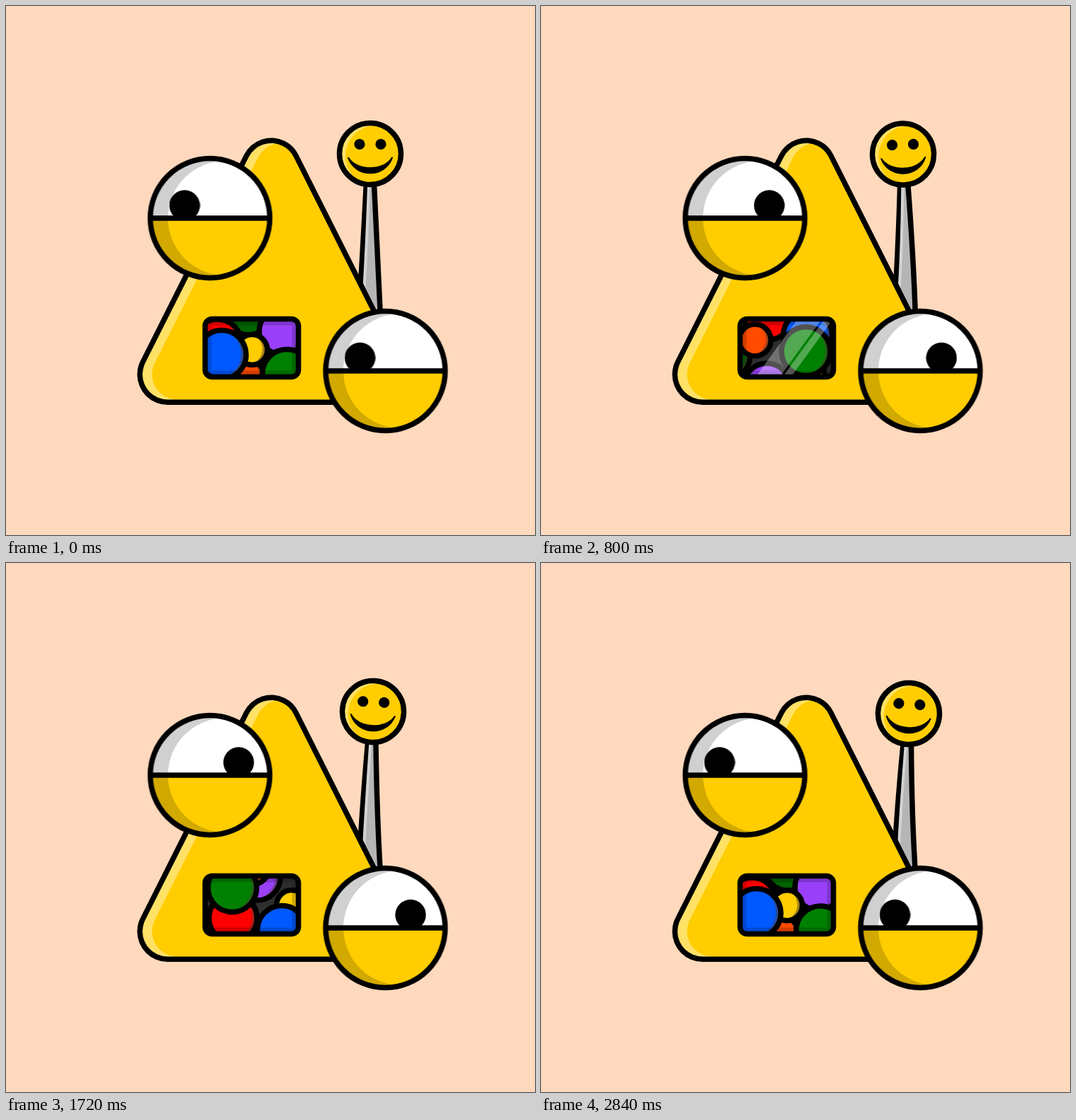
These frames come from a looping animation (748 by 748 pixels, 2880 ms). An HTML page:

```html
<!DOCTYPE html>
<html lang="en">
<head>
<meta charset="utf-8">
<title>Triangle creature</title>
<style>
  html, body { margin: 0; width: 100%; height: 100%; overflow: hidden; background: #ffd9bd; }
  svg { display: block; width: 100vw; height: 100vh; }
  .line { fill: none; stroke: #000; stroke-width: 7.5; }
  .pupil { animation: look 2880ms infinite; }
  @keyframes look {
    0% { transform: translateX(0); animation-timing-function: cubic-bezier(.17, .17, .15, 1); }
    49.3% { transform: translateX(var(--reach)); animation-timing-function: cubic-bezier(.85, 0, .83, .83); }
    98.6%, 100% { transform: translateX(0); }
  }
</style>
</head>
<body>
<svg viewBox="0 0 748 748">
  <defs>
    <path id="tri" d="M228.5 521L375 229.5L521.5 521Z" stroke-linejoin="round"/>
    <mask id="bodyMask" maskUnits="userSpaceOnUse" x="0" y="0" width="748" height="748">
      <use href="#tri" fill="#fff" stroke="#fff" stroke-width="71"/>
    </mask>
    <clipPath id="ball"><circle r="84.5"/></clipPath>
    <clipPath id="upper"><rect x="-85" y="-85" width="170" height="85"/></clipPath>
    <clipPath id="headClip"><circle r="43.5"/></clipPath>
    <clipPath id="glass"><rect x="281.5" y="442.5" width="132" height="82" rx="10"/></clipPath>
    <g id="eyeBack" clip-path="url(#ball)">
      <rect x="-85" y="-85" width="170" height="85" fill="#d0d0d0"/>
      <rect x="-85" width="170" height="85" fill="#d1a900"/>
      <path d="M-59.5 0A81 81 0 0 1 102.5 0Z" fill="#fff"/>
      <path d="M-59.5 0A81 81 0 0 0 102.5 0Z" fill="#ffcd00"/>
    </g>
    <g id="eyeFront" class="line"><path d="M-84 0H84"/><circle r="84.5"/></g>
  </defs>

  <rect width="748" height="748" fill="#ffd9bd"/>

  <path id="rod" fill="#b5b5b5" stroke="#000" stroke-width="7.5"/>
  <path id="rodLight" fill="none" stroke="#d2d2d2" stroke-width="4"/>
  <g id="head">
    <circle r="43.5" fill="#ffe166"/>
    <circle cx="8" cy="3" r="43" fill="#ffcd00" clip-path="url(#headClip)"/>
    <circle class="line" r="43.5"/>
    <circle cx="-15" cy="-13.5" r="7.6"/>
    <circle cx="15" cy="-13.5" r="7.6"/>
    <path d="M-31 5.5C-21 34.5 21 34.5 31 5.5C19 25 -19 25 -31 5.5Z" stroke="#000" stroke-width="2" stroke-linejoin="round"/>
  </g>

  <use href="#tri" stroke="#000" stroke-width="86"/>
  <g mask="url(#bodyMask)">
    <rect width="748" height="748" fill="#ffe166"/>
    <use href="#tri" x="13.5" fill="#ffcd00" stroke="#ffcd00" stroke-width="71"/>
  </g>

  <g clip-path="url(#glass)">
    <rect x="278" y="439" width="139" height="89" fill="#2e2e2e"/>
    <g id="balls"></g>
    <rect x="281.5" y="442.5" width="132" height="82" rx="10" fill="none" stroke="#000" stroke-opacity=".18" stroke-width="18"/>
    <path id="glare" fill="#fff" fill-opacity=".32" d="M-46 445H-12L-68 522H-102ZM-8 445H4L-52 522H-64Z"/>
  </g>
  <rect class="line" x="281.5" y="442.5" width="132" height="82" rx="10"/>

  <g transform="translate(288.5 300)">
    <use href="#eyeBack"/>
    <g clip-path="url(#upper)"><circle class="pupil" style="--reach: 78px" cx="-36" cy="-18" r="21.7"/></g>
    <use href="#eyeFront"/>
  </g>
  <g transform="translate(536.5 516)">
    <use href="#eyeBack"/>
    <g clip-path="url(#upper)"><circle class="pupil" style="--reach: 73px" cx="-36" cy="-18.5" r="21.7"/></g>
    <use href="#eyeFront"/>
  </g>
</svg>
<script>
  const LOOP = 2880;
  const KEYS = [0, 520, 1080, 1720, 2120, 2440];
  const $ = id => document.getElementById(id);

  // Back to front; each path lists the x and y a ball passes at KEYS.
  const BALLS = [
    { color: '#006400', r: 32, x: [343, 272, 271, 330, 412, 408], y: [433, 484, 492, 425, 506, 436] },
    { color: '#9a40fa', r: 33, x: [391, 338, 313, 355, 364, 377], y: [460, 544, 514, 444, 466, 478] },
    { color: '#ff0000', r: 34, x: [299, 298, 342, 321, 310, 291], y: [477, 442, 445, 502, 495, 490] },
    { color: '#ff4a00', r: 22.5, x: [343, 322, 293, 349, 325, 309], y: [524, 490, 457, 432, 458, 489] },
    { color: '#ffcd00', r: 21.5, x: [348, 362, 396, 404, 387, 358], y: [486, 533, 505, 484, 467, 480] },
    { color: '#0059ff', r: 34.5, x: [305, 352, 395, 390, 368, 333], y: [493, 472, 468, 519, 535, 518] },
    { color: '#008000', r: 34.5, x: [397, 391, 355.5, 320, 322, 359], y: [520, 482, 495, 459, 469, 483] }
  ];

  const HEAD = {
    keys: [...KEYS, 2840],
    x: [515, 505.5, 519.5, 519, 516.5, 511.5, 520],
    y: [209, 209, 210, 210, 210, 209.5, 213]
  };

  // Smooth closed curve through values given at uneven times.
  function follow(keys, values, t) {
    const n = keys.length;
    const time = i => keys[(i + n) % n] + LOOP * Math.floor(i / n);
    const value = i => values[(i + n) % n];
    const slope = i => (value(i + 1) - value(i - 1)) / (time(i + 1) - time(i - 1));
    let i = n - 1;
    while (keys[i] > t) i--;
    const span = time(i + 1) - time(i);
    const u = (t - time(i)) / span, v = 1 - u;
    return v * v * (1 + 2 * u) * value(i) + u * u * (3 - 2 * u) * value(i + 1)
      + span * u * v * (v * slope(i) - u * slope(i + 1));
  }

  BALLS.forEach((ball, i) => {
    $('balls').insertAdjacentHTML('beforeend', `<g>
      <clipPath id="clip${i}"><circle r="${ball.r}"/></clipPath>
      <circle r="${ball.r}" fill="${ball.color}"/>
      <circle r="${ball.r}" fill="#503c32" fill-opacity=".5"/>
      <circle cx="-7" cy="-1" r="${ball.r}" fill="${ball.color}" clip-path="url(#clip${i})"/>
      <circle class="line" r="${ball.r}"/></g>`);
    ball.node = $('balls').lastElementChild;
  });

  function drawAntenna(t) {
    const x = follow(HEAD.keys, HEAD.x, t), y = follow(HEAD.keys, HEAD.y, t);
    const lean = x - 515;
    const bend = -0.4 * lean;
    $('head').setAttribute('transform', `translate(${x} ${y}) rotate(${lean * 0.72})`);
    $('rod').setAttribute('d', `M498.5 440Q${505 + bend} 340 ${x - 3.5} ${y}H${x + 3.5}Q${525 + bend} 340 529.5 440Z`);
    $('rodLight').setAttribute('d', `M504 440Q${510.5 + bend} 340 ${x - 0.5} ${y}`);
  }

  function draw(t) {
    for (const { node, x, y } of BALLS) {
      node.setAttribute('transform', `translate(${follow(KEYS, x, t)} ${follow(KEYS, y, t)})`);
    }
    drawAntenna(t);
    const edge = t < 1500 ? 309 + 0.35 * (t - 520) : 300 + 0.35 * (t - 2120);
    $('glare').setAttribute('transform', `translate(${edge} 0)`);
  }

  function tick() {
    draw(performance.now() % LOOP);
    requestAnimationFrame(tick);
  }
  tick();
</script>
</body>
</html>
```
